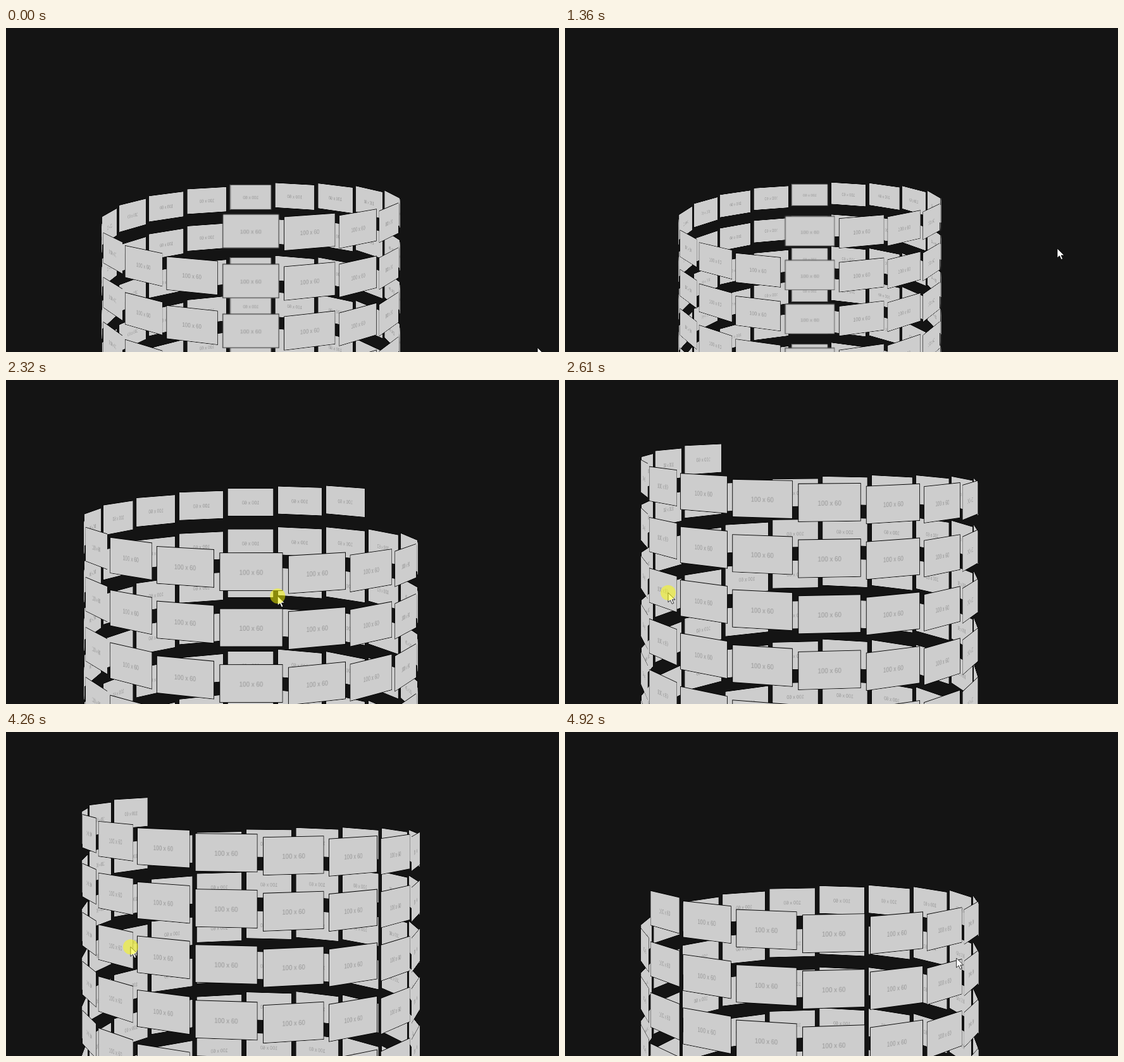
Animation, 874 px wide and 513 px high, one loop 5.3 s. Source, as an HTML page:

```html
<!DOCTYPE html>
<html lang="en">
<head>
<meta charset="utf-8">
<title>Card helix</title>
<style>
  html, body { margin: 0; width: 100%; height: 100%; overflow: hidden; background: #141414; }
  #view {
    position: absolute; inset: 0; overflow: hidden;
    perspective: 1482px; perspective-origin: 386.75px 16.6px;
  }
  #helix { position: absolute; left: 386.75px; top: 16.6px; transform-style: preserve-3d; }
  #helix div {
    position: absolute; left: -51px; top: -31px; width: 100px; height: 60px;
    border: 1px solid #000; background: #cdcdcd; color: #969696;
    font: 10px/64px "Liberation Sans", Arial, sans-serif; text-align: center; white-space: nowrap;
  }
  svg { position: absolute; left: 0; top: 0; width: 100%; height: 100%; }
</style>
</head>
<body>
<div id="view"><div id="helix"></div></div>
<svg>
  <g id="pointer">
    <path d="M0 0V15L3.6 11.8L6.2 17.6L8.7 16.5L6.2 11H11Z" fill="#fff" stroke="#000" stroke-width=".8"/>
    <circle id="press" r="12" fill="#ff0" fill-opacity=".5"/>
  </g>
</svg>
<script>
const LOOP = 5300, CARDS = 200, PER_TURN = 18, RADIUS = 314, DROP = 5;
const DEG_PER_PX = 1.03, GRAB_LEFT = 642.8, GRAB_RIGHT = 98.2, RELEASE = 3590;

// pointer moves, drawn in even steps; a larger lead gets going sooner
const home = { x: 840, y: 506 };
const enter = { start: 70, step: 60, count: 3, lead: 1, x: 778, y: 349 };
const left = { start: 1800, step: 73.6, count: 17, lead: 1.223, x: 71, y: 335 };
const right = { start: 4040, step: 73.3, count: 13, lead: 1.44, x: 618.6, y: 358 };

const zoomOut = [330, 400, 460, 460], zoomIn = [930, 1000, 1360, 1430, 1580];

const byId = id => document.getElementById(id);
const helix = byId('helix'), pointer = byId('pointer'), press = byId('press');

for (let i = 0; i < CARDS; i++) {
  const card = document.createElement('div');
  card.textContent = '100 x 60';
  card.style.transform =
    `rotateY(${i * 360 / PER_TURN}deg) translate3d(0, ${i * DROP}px, ${RADIUS}px)`;
  helix.append(card);
}

function progress(t, { start, step, count, lead }) {
  const n = Math.floor((t - start + 4) / step) + 1;
  const u = Math.min(1, Math.max(0, n / count));
  const gone = lead * u ** 1.94;
  return gone / (gone + (1 - u) ** 1.94);
}

function pointAt(t) {
  let { x, y } = home;
  for (const move of [enter, left, right]) {
    const u = progress(t, move);
    x += (move.x - x) * u;
    y += (move.y - y) * u;
  }
  return [x, y];
}

const passed = (times, t) => times.filter(at => t >= at).length;

function draw(t) {
  const [x, y] = pointAt(t);
  const back = t > RELEASE;
  const dragLeft = Math.max(0, GRAB_LEFT - (back ? left.x : x));
  const dragRight = back ? Math.max(0, x - GRAB_RIGHT) : 0;
  const turn = DEG_PER_PX * (dragRight - dragLeft);
  const zoom = 1 + 0.12 * (passed(zoomIn, t) - passed(zoomOut, t));
  const down = back ? dragRight > 0 && x < right.x : dragLeft > 0;

  helix.style.transform =
    `translate3d(0, 347px, -520px) scale(${zoom}) translateY(${turn / 3}px) rotateY(${turn}deg)`;
  pointer.setAttribute('transform', `translate(${x} ${y})`);
  press.style.display = down ? '' : 'none';
}

const begin = performance.now();
function tick() {
  draw((performance.now() - begin) % LOOP);
  requestAnimationFrame(tick);
}
tick();
</script>
</body>
</html>
```
